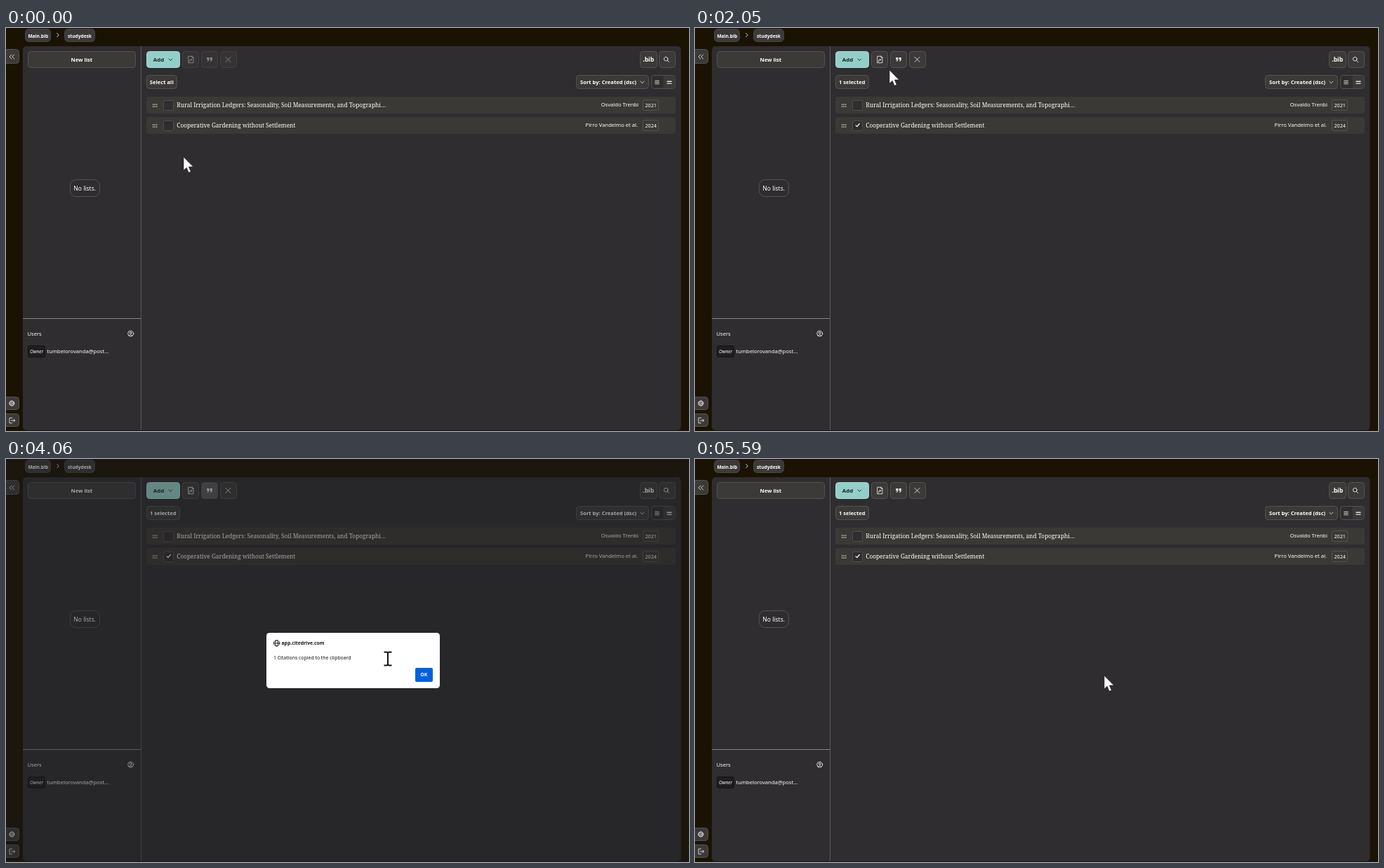
Animation of 973x575 px, one loop 5.67 s. Source, as an HTML page:

```html
<!DOCTYPE html>
<html lang="en">
<head>
<meta charset="utf-8">
<title>Copy a citation</title>
<style>
  html, body { margin: 0; width: 100%; height: 100%; overflow: hidden; background: #1a1304; }
  svg { display: block; width: 973px; height: 575px; }
  text { font-family: "Noto Sans", "Open Sans", sans-serif; white-space: pre; }
  .serif { font-family: "Noto Serif", serif; }
  .icon { fill: none; stroke: #e4e2e0; stroke-width: .9; stroke-linecap: round; stroke-linejoin: round; }
</style>
</head>
<body>
<svg id="stage" viewBox="0 0 973 575"></svg>
<script>
const LOOP = 5670;
const PANEL = '#2f2d30', BUTTON = '#3b3a38', EDGE = '#555352';

const box = (x, y, w, h, r = 4, fill = BUTTON, edge = EDGE, extra = '') =>
  `<rect x="${x + .5}" y="${y + .5}" width="${w - 1}" height="${h - 1}" rx="${r}" fill="${fill}" stroke="${edge}" ${extra}/>`;

// y is the middle of the capital letters
const text = (x, y, str, { size = 7.6, weight = 400, anchor = 'start', fill = '#fff', extra = '' } = {}) =>
  `<text x="${x}" y="${y + size * .357}" font-size="${size}" font-weight="${weight}" text-anchor="${anchor}" fill="${fill}" ${extra}>${str}</text>`;

const bold = (x, y, str, more) => text(x, y, str, { weight: 600, anchor: 'middle', ...more });
const icon = (d, extra = '') => `<path class="icon" d="${d}" ${extra}/>`;

const row = (y, title, author, authorEnd, year, id) => `
  <rect x="200" y="${y - 12}" width="754" height="24" rx="3.5" fill="#3a3936"/>
  ${[209.5, 212, 214.5].map(x => [-1.5, 1.5].map(dy =>
    `<rect x="${x - .6}" y="${y + dy - .1}" width="1.4" height="1.4" fill="#d8d6d4"/>`).join('')).join('')}
  ${box(224, y - 7, 15, 15, 2, PANEL, '#514f4e', `id="${id}"`)}
  ${text(243.3, y, title, { size: 8.3, extra: 'class="serif"' })}
  ${text(authorEnd, y - .3, author, { anchor: 'end' })}
  ${box(907, y - 8, 23, 16, 2, 'none')}
  ${text(918.7, y + .3, year, { size: 7.2, anchor: 'middle' })}`;

const sidebar = `
  ${box(-6, 30, 25, 21)}${icon('M8 38l-3 3 3 3M11.7 38l-3 3 3 3')}
  ${box(-6, 526, 25, 19)}
  <circle class="icon" cx="8.3" cy="535.5" r="3.6" stroke-width="1.3" stroke-dasharray="1.8 1"/>
  <circle class="icon" cx="8.3" cy="535.5" r="1.3"/>
  <circle class="icon" cx="8.3" cy="535.5" r="3"/>
  ${box(-6, 550, 25, 19)}${icon('M8.5 556.3H5v7.4h3.5M7.5 560H12.7m-2-2 2 2-2 2')}
  ${box(31, 33, 154, 24)}${bold(107.8, 45, 'New list')}
  ${box(91, 216, 43, 25, 8, 'none')}${text(112.2, 229, 'No lists.', { size: 8.5, anchor: 'middle' })}
  <path d="M24 414.5H192" stroke="#858386"/>
  ${text(30.5, 436, 'Users')}
  <circle class="icon" cx="177.7" cy="436" r="4"/>
  <circle class="icon" cx="177.7" cy="435" r="1.4"/>${icon('M175.2 438.8q2.5-2.6 5 0')}
  ${box(31, 453, 25, 17, 2, '#1f1d1f', '#141314')}
  ${text(43.6, 462, 'Owner', { size: 6.5, weight: 500, anchor: 'middle', extra: 'font-style="italic"' })}
  ${text(58.5, 461.7, 'tumbelorovanda@post...')}`;

const toolbar = `
  ${box(200, 33, 48, 24, 4, '#93cfc8', '#a3d8d1')}
  ${bold(217.5, 45, 'Add', { size: 7.8, fill: '#17211f' })}
  ${icon('M232 44l2.4 2.4 2.4-2.4', 'style="stroke:#17211f"')}
  <g id="actions">
    ${box(251, 33, 24, 24)}
    ${icon('M265 40.3h-5.3v9.4h7.2v-7.4zM265 40.3v2h2M261.5 48v-1.2q0-1.5 1.7-1.5h1.6m-1.2-1.2 1.2 1.2-1.2 1.2')}
    ${box(278, 33, 24, 24, 4, BUTTON, EDGE, 'id="quote"')}
    <path fill="#e4e2e0" d="M286.2 42h3.2v3q0 2.4-2.7 3v-1q1.2-.5 1.2-1.8h-1.7zM290.6 42h3.2v3q0 2.4-2.7 3v-1q1.2-.5 1.2-1.8h-1.7z"/>
    ${box(305, 33, 24, 24)}${icon('M313 41.5l7 7m0-7-7 7')}
  </g>
  ${box(903, 33, 25, 24)}${bold(915.2, 45, '.bib', { size: 8.6 })}
  ${box(930, 33, 24, 24)}<circle class="icon" cx="940.2" cy="44.2" r="2.8"/>${icon('M942.4 46.4l2.2 2.2')}
  <g id="none">${box(200, 67, 44, 20)}${bold(221.8, 77, 'Select all')}</g>
  <g id="one">${box(200, 67, 48, 20)}${bold(223.7, 77, '1 selected', { size: 7.5 })}</g>
  ${box(812, 67, 104, 20)}${text(818, 77, 'Sort by: Created (dsc)', { weight: 600 })}
  ${icon('M903.8 76.2l2.5 2.5 2.5-2.5')}
  ${box(919, 67, 35, 20, 4, PANEL)}<path d="M936.5 68V86h13q4 0 4-4V72q0-4-4-4z" fill="${BUTTON}"/>
  ${icon('M924.7 75.3h5.6m-5.6 2.2h5.6m-5.6 2.2h5.6', 'stroke-linecap="butt"')}
  ${icon('M942 76.2h6m-6 2.9h6', 'style="stroke-width:1.4"')}`;

const dialog = `
  <g id="dialog">
    <rect width="973" height="575" fill="#1c1c20" opacity=".4"/>
    <rect x="371" y="248" width="247" height="79" rx="4.5" fill="#fff"/>
    <g class="icon" style="stroke:#15141a">
      <circle cx="385.6" cy="262.8" r="4.2"/><ellipse cx="385.6" cy="262.8" rx="1.9" ry="4.2"/>
      <path d="M381.4 262.8h8.4"/>
    </g>
    ${text(392.5, 263, 'app.citedrive.com', { size: 6.8, weight: 600, fill: '#15141a' })}
    ${text(381, 284, '1 Citations copied to the clipboard', { size: 6.9, fill: '#15141a' })}
    <rect id="ok" x="583" y="298" width="25" height="20" rx="2"/>
    ${bold(595.3, 308, 'OK', { size: 6.9 })}
  </g>`;

const pointers = `
  <g id="cursor">
    <circle id="halo" r="14.5" fill="#ff0" opacity=".55"/>
    <path id="arrow" d="M0 0V19L4.2 15.2 7.2 22.3 10.3 21 7.4 14H13.7Z" fill="#fff" stroke="#1b1a1c" stroke-width=".6"/>
    <path id="beam" d="M-5.5-9.5h3.5q2 0 2 2V7.5q0 2-2 2h-3.5M5.5-9.5H2q-2 0-2 2V7.5q0 2 2 2h3.5" fill="none" stroke="#111" stroke-width="2"/>
    <path id="hand" d="M-2 2.5Q-2 .6 0 .6T2 2.5V9Q5.5 7.6 5.8 10 9 9 9.2 11.3 12.3 10.8 12.3 13.5V19Q12.3 22 10.5 23.5V26.5H-.8V24.5L-6.8 17.2Q-8 15-6.3 14.2T-2 16.8Z M2 9V14M5.8 10V14M9.2 11.3V14.5"
      fill="#fff" stroke="#111" stroke-width="1" stroke-linejoin="round"/>
  </g>`;

document.getElementById('stage').innerHTML = `
  ${box(27, 1, 37, 19, 5, BUTTON, '#454442')}${bold(45.8, 11.3, 'Main.bib', { size: 6.6 })}
  ${icon('M72.7 7.5l2.5 2.6-2.5 2.6')}
  ${box(83, 1, 44, 19, 5, BUTTON, '#454442')}${bold(105, 11.3, 'studydesk', { size: 6.6 })}
  <rect x="24" y="26" width="937.5" height="548" rx="5" fill="${PANEL}"/>
  <path d="M192.5 26V574" stroke="#5c5a5d"/>
  ${sidebar}${toolbar}
  ${row(110, 'Rural Irrigation Ledgers: Seasonality, Soil Measurements, and Topographi…', 'Osvaldo Trenbi', 901, '2021', 'first')}
  ${row(139, 'Cooperative Gardening without Settlement', 'Pirro Vandelmo et al.', 900, '2024', 'second')}
  ${icon('M229 138.8l1.9 1.9 3.4-4.2', 'id="check" style="stroke:#fff;stroke-width:1.2"')}
  ${dialog}${pointers}`;

// start, end, number of steps, target x, y
const START = [253, 184];
const moves = [
  [260, 800, 8, 235, 144], [880, 960, 2, 232, 140],
  [1780, 2050, 5, 277, 60], [2130, 2130, 1, 278, 60], [2210, 2360, 3, 281, 52],
  [3290, 3830, 8, 532, 278], [4060, 4060, 1, 544, 285], [4140, 4440, 5, 588, 302],
  [4660, 4660, 1, 589, 305], [5200, 5280, 2, 587, 307], [5430, 5590, 3, 583, 309]
];

function cursorAt(t) {
  let [x, y] = START;
  for (const [from, to, steps, tx, ty] of moves) {
    if (t < from) break;
    const step = steps === 1 ? 1 : Math.min(steps, 1 + Math.floor((t - from) / (to - from) * (steps - 1) + .15));
    const p = step / steps, ease = p * p * (3 - 2 * p);
    x += (tx - x) * ease;
    y += (ty - y) * ease;
  }
  return [x, y];
}

const el = id => document.getElementById(id);
const show = (id, on) => el(id).setAttribute('visibility', on ? 'visible' : 'hidden');
const fill = (id, color) => el(id).setAttribute('fill', color);

function render(t) {
  const within = (a, b) => t >= a && t < b;
  const [x, y] = cursorAt(t);
  const selected = t >= 1700;
  const hand = within(2210, 2930) || within(4360, 5120);
  const beam = within(4060, 4290);
  const press = within(4660, 4820);

  el('cursor').setAttribute('transform', `translate(${x.toFixed(1)} ${y.toFixed(1)})`);
  show('hand', hand);
  show('beam', beam);
  show('arrow', !hand && !beam);
  show('halo', within(1630, 1700) || within(2790, 2930) || press);

  show('none', !selected);
  show('one', selected);
  show('check', selected);
  el('actions').setAttribute('opacity', selected ? 1 : .5);
  fill('second', x < 239 && y < 147 ? '#5b595b' : PANEL);
  fill('quote', within(2210, 4820) ? '#595759' : BUTTON);
  show('dialog', within(2930, 4820));
  fill('ok', press ? '#053e94' : t >= 4360 ? '#0250bb' : '#0060df');
}

function tick() {
  render(performance.now() % LOOP);
  requestAnimationFrame(tick);
}
tick();
</script>
</body>
</html>
```
